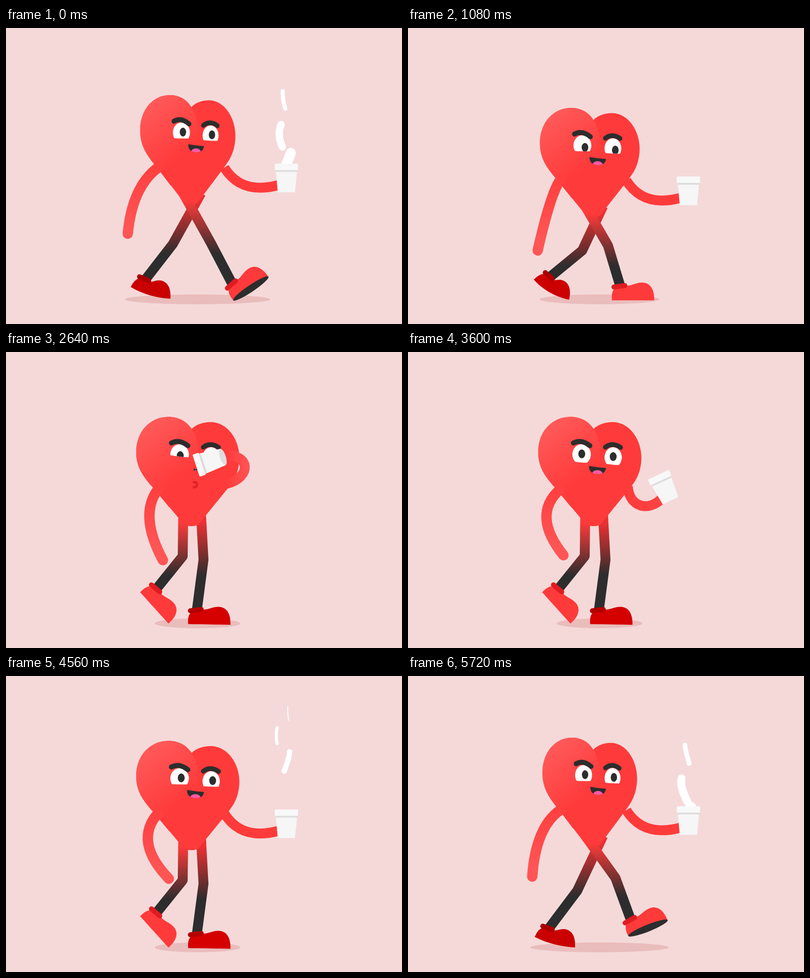
Recreate the animation shown at these times as an HTML page with a canvas. Size 800 by 600 pixels, loop 5760 ms.

```html
<!DOCTYPE html>
<html lang="en">
<head>
<meta charset="utf-8">
<title>Heart on a coffee walk</title>
<style>
html, body { margin: 0; width: 100%; height: 100%; overflow: hidden; background: #f5d9d9; }
canvas { display: block; }
</style>
</head>
<body>
<canvas id="stage" width="800" height="600"></canvas>
<script>
const ctx = document.getElementById('stage').getContext('2d');
const LOOP = 5760, WALK = 960, STEP = 480, TICK = 40;
const RED = '#ff3a3a', DARK = '#2d2d2d';
const RAD = Math.PI / 180;

// phase: bob, heart width, shadow radius
const BODY = [
  [0, 0, .923, 147], [120, 26, .966, 121], [240, -4.5, 1, 86.5],
  [280, -13.5, .976, 81], [360, -31, .94, 107], [440, -11, .917, 140]
];

// phase: heel x, heel y, heel angle, toe angle, knee x, knee y
const LEG = [
  [0, 459, 552, -34, -34, 414, 436],
  [40, 449, 552, -13, -13, 414, 441],
  [80, 433, 552, 0, 0, 410, 443],
  [120, 412, 552, 0, 0, 404, 441],
  [240, 332, 551.5, 1, 1, 363, 421],
  [280, 303, 548, 2.7, 2.7, 349, 422],
  [440, 220, 529, 28, 3, 306, 435],
  [480, 216, 525, 32, 3, 301, 438],
  [540, 203, 518, 42, 8, 305, 446],
  [600, 218, 510, 50, 12, 316, 451],
  [720, 271, 487, 48, 48, 357, 414],
  [760, 307, 482, 44, 44, 382, 396],
  [920, 445, 527, -22, -22, 419, 409]
];

// phase: hand x, y, bend x, y
const SWING = [
  [0, 246, 417, 255, 322], [120, 262, 425, 288, 310], [240, 320, 425, 285, 335],
  [480, 395, 395, 265, 375], [720, 329, 415.5, 257, 340],
  [760, 311, 419.5, 254, 338], [920, 251, 417.5, 258, 318]
];

// cup arm: four curve points, cup centre, cup angle
const REST = [441, 283, 463, 318, 498, 333, 552, 318, 566.5, 304, 0];
const LIFT = [444, 277, 448, 322, 488, 327, 512, 302, 518, 279.5, -25];
const SIP = [443, 272, 492, 278, 501, 240, 465, 243, 437, 235.5, -88];
const DRINK = [445, 272, 496, 260, 496, 210, 438, 213.5, 411.5, 226, -108];
const ARM = [
  [0, ...REST], [1160, ...REST], [1420, ...LIFT], [1720, ...SIP],
  [1880, ...DRINK], [3200, ...DRINK], [3600, ...LIFT], [3840, ...REST]
];

// time: lid left, lid right, gaze x, gaze y, mouth size
const FACE = [
  [0, 218, 219, 0, 0, 1], [840, 218, 219, 0, 0, 1], [1080, 218, 219, 2, 5, 1],
  [1400, 218, 219, 2, 5, 1], [1720, 208, 216, 0, 3.5, .6],
  [1900, 208, 214, -2, 3.5, .2], [3200, 208, 214, -2, 3.5, .2],
  [3600, 221, 225, -3, 0, 1], [4300, 219, 219, 0, 0, 1]
];

// spawn time, base x, sway, y of leftmost point
const STEAM = [
  [3876, 576, 7, 70], [4016, 553, 7, 121], [4179, 565, 8, 219],
  [5294, 565, 6, 132], [5520, 562, 10, 215], [5713, 567, 10, 309]
];

const clamp = (v, a = 0, b = 1) => Math.min(b, Math.max(a, v));
const mod = (v, n) => ((v % n) + n) % n;

// periodic monotone cubic through a table of keys
function sample(keys, time, period) {
  const n = keys.length, t = mod(time, period);
  const key = i => keys[mod(i, n)];
  const at = i => key(i)[0] + Math.floor(i / n) * period;
  let i = n - 1;
  while (at(i) > t) i--;
  const h = at(i + 1) - at(i), u = (t - at(i)) / h;
  return key(i).slice(1).map((a, j) => {
    const rate = k => (key(k + 1)[j + 1] - key(k)[j + 1]) / (at(k + 1) - at(k));
    const slope = k => {
      const p = rate(k - 1), q = rate(k);
      return p * q <= 0 ? 0 : 2 * p * q / (p + q);
    };
    const b = key(i + 1)[j + 1], m0 = slope(i) * h, m1 = slope(i + 1) * h;
    return a + u * m0 + u * u * (3 * (b - a) - 2 * m0 - m1) + u * u * u * (2 * (a - b) + m0 + m1);
  });
}

function shape(d, fill) {
  ctx.fillStyle = fill;
  ctx.fill(new Path2D(d));
}

function line(d, width, color, cap = 'round') {
  ctx.lineWidth = width;
  ctx.lineCap = cap;
  ctx.lineJoin = 'round';
  ctx.strokeStyle = color;
  ctx.stroke(new Path2D(d));
}

function oval(x, y, rx, ry, fill, turn = 0) {
  ctx.fillStyle = fill;
  ctx.beginPath();
  ctx.ellipse(x, y, rx, ry, turn, 0, 7);
  ctx.fill();
}

function blend(x0, y0, x1, y1, from, to) {
  const g = ctx.createLinearGradient(x0, y0, x1, y1);
  g.addColorStop(0, from);
  g.addColorStop(1, to);
  return g;
}

// bends the flat shoe: heel turned by a, toe by b
function bender(hx, hy, a, b) {
  const turn = x => (a + (b - a) * clamp((x - 20) / 40)) * RAD;
  return (x, y) => {
    let px = hx, py = hy;
    const steps = 12, d = x / steps;
    for (let i = 0; i < steps; i++) {
      const th = turn((i + .5) * d);
      px += d * Math.cos(th);
      py += d * Math.sin(th);
    }
    const th = turn(x);
    return [px - y * Math.sin(th), py + y * Math.cos(th)];
  };
}

function drawLeg(phase, far, bob) {
  const shift = far ? 36 : 0;
  let [hx, hy, a, b, kx, ky] = sample(LEG, phase, WALK);
  hx += shift;
  kx += shift;
  const at = bender(hx, hy, a, b);
  const tone = Math.round(213 - 11 * Math.cos((phase - STEP) / WALK * 2 * Math.PI));
  const shoe = far ? `rgb(${tone},0,0)` : RED;
  const cuff = far ? `rgb(${tone - 32},0,0)` : '#e01c20';
  const skin = blend(0, 350 + bob, 0, 457 + bob, far ? '#ec3032' : RED, DARK);
  line(`M${358 + shift},${335 + bob} L${kx},${ky} L${at(17, -28)}`, 20, skin, 'butt');

  ctx.beginPath();
  ctx.moveTo(...at(0, 0));
  const curve = (...p) => ctx.bezierCurveTo(...at(p[0], p[1]), ...at(p[2], p[3]), ...at(p[4], p[5]));
  curve(-1, -12, 0, -21, 9, -27);
  curve(20, -32, 26, -29, 34, -30);
  curve(42, -31, 50, -36, 61, -36);
  curve(76, -36, 86, -24, 85.5, 0);
  curve(60, 0, 30, 0, 0, 0);
  ctx.fillStyle = shoe;
  ctx.fill();
  line(`M${at(4, -27)} L${at(26, -30)}`, 10, cuff);
  if (a < -1) {
    const [cx, cy] = at(43, 0);
    oval(cx, cy, 43, 7 * clamp(-a / 20), DARK, a * RAD);
  }
}

function drawEye(x, y, rx, lidA, lidB, gx, gy) {
  ctx.save();
  ctx.clip(new Path2D(`M${x - 25},150 H${x + 25} V${lidB} Q${x},${(lidA + lidB) / 2 + 2} ${x - 25},${lidA} Z`));
  oval(x, y, rx, 20.5, '#fff');
  oval(gx, gy, 7, 9, DARK);
  ctx.restore();
}

function drawHeart(t, bob, sx) {
  const left = 'M298,276 C276,252 263,232 263,203 C263,160 292,132 327,131.5 C350,131 366,142 375,156';
  ctx.save();
  ctx.translate(367, bob + 4.5);
  ctx.scale(sx, 1);
  ctx.translate(-367, 0);
  shape(left + ' C384,147 398,142 414,142 C450,143 471.5,180 471.5,214 C471,245 460,262 446,279' +
    ' L403,332 L391,347 Q386,353 375,353 Q364,353 359,349 Z', RED);
  shape(left + ' C386,172 390,190 389,210 L375,300 L330,315 Z', blend(290, 150, 365, 245, '#ff5858', RED));

  ctx.translate(32 * (1 - sx) / sx, 0);
  const [lidA, lidB, dx, dy, mouth] = sample(FACE, t, LOOP);
  drawEye(350.7, 207.5, 18.7, lidA, lidB, 354 + dx, 206.5 + dy);
  drawEye(414.5, 213.5, 17.5, lidA + 4, lidB + 5, 417.5 + dx, 212 + dy);
  line('M334,184.5 Q350,176 367.5,190', 10, DARK);
  line('M398.5,193 Q413,182 429.5,193.5', 9.5, DARK);

  ctx.save();
  ctx.translate(382.5, 239);
  ctx.scale(mouth, Math.min(1, mouth * 1.6));
  const lips = 'M-17,-8 Q0,-5 17.5,-4 Q16,8.5 1,8.5 Q-17,8 -17,-8 Z';
  shape(lips, DARK);
  ctx.clip(new Path2D(lips));
  oval(0, 8.5, 11, 8, '#ff58a6');
  ctx.restore();
  if (t >= 1900 && t <= 3100) line('M379.5,264 C388,262 388,275 379.5,274', 5, '#e02226');
  ctx.restore();
}

function drawSteam(t, limit) {
  ctx.save();
  ctx.beginPath();
  ctx.rect(0, 0, 800, limit);
  ctx.clip();
  for (const [born, base, sway, low] of STEAM) {
    const y = 295 - .32 * mod(t - born, LOOP);
    const width = (y - 55) / 11;
    if (width <= 0) continue;
    const half = 13 + (y - 70) * .065;
    const pts = [];
    for (let i = -4; i <= 4; i++) {
      const py = y + half * i / 4;
      pts.push(`${base - sway * Math.cos((py - low) / 22)},${py}`);
    }
    line('M' + pts.join(' L'), width, '#fff');
  }
  ctx.restore();
}

function drawCup(x, y, angle) {
  ctx.save();
  ctx.translate(x, y);
  ctx.rotate(angle * RAD);
  shape('M-21.5,-14 H21.5 L17.5,28 Q17.5,29 16,29 H-16 Q-17.5,29 -17.5,28 Z', '#f6f6f6');
  ctx.fillStyle = '#dcdcdc';
  ctx.fillRect(-21.7, -16, 43.4, 3.5);
  shape('M-21.5,-29 H21.5 Q23.5,-29 23.5,-27 V-18 Q23.5,-16 21.5,-16 H-21.5 Q-23.5,-16 -23.5,-18 V-27 Q-23.5,-29 -21.5,-29 Z', '#f8f8f8');
  const tip = clamp((-angle - 75) / 33);
  if (tip > 0) oval(0, 28, 17, 6 * tip, '#dedede');
  ctx.restore();
}

function drawCupArm(t, bob) {
  const [sx, sy, ax, ay, bx, by, ex, ey, cx, cy, angle] = sample(ARM, t, LOOP);
  const light = Math.round(58 + 24 * clamp(-angle / 90));
  ctx.save();
  ctx.translate(0, bob);
  line(`M${sx},${sy} C${ax},${ay} ${bx},${by} ${ex},${ey}`, 20,
    blend(442, 0, 488, 0, RED, `rgb(255,${light},${light})`), 'butt');
  ctx.restore();
  drawSteam(t, cy + bob);
  drawCup(cx, cy + bob, angle);
}

function drawSwingArm(t, bob) {
  let [hx, hy, cx, cy] = sample(SWING, t, WALK);
  const near = time => clamp(1 - Math.abs(t - time) / 440);
  const sip = near(2640), lower = near(3600);
  hx -= 12 * sip + 15 * lower;
  hy += 11 * sip + lower;
  cx += 11 * sip - 8 * lower;
  cy -= 5 * (sip + lower);
  ctx.save();
  ctx.translate(0, bob);
  line(`M307,283 Q${cx},${cy} ${hx},${hy}`, 21, blend(0, 275, 0, 400, '#ff3e3e', '#ff5555'));
  ctx.restore();
}

function draw(t) {
  const [bob, sx, shadow] = sample(BODY, t, STEP);
  ctx.fillStyle = '#f5d9d9';
  ctx.fillRect(0, 0, 800, 600);
  oval(387, 550, shadow, 10, '#e9bdbc');
  drawLeg(mod(t + STEP, WALK), true, bob);
  drawHeart(t, bob, sx);
  drawLeg(mod(t, WALK), false, bob);
  drawCupArm(t, bob);
  drawSwingArm(t, bob);
}

const start = performance.now();
function loop() {
  const t = (performance.now() - start) % LOOP;
  draw(Math.floor(t / TICK) * TICK);
  requestAnimationFrame(loop);
}
loop();
</script>
</body>
</html>
```
